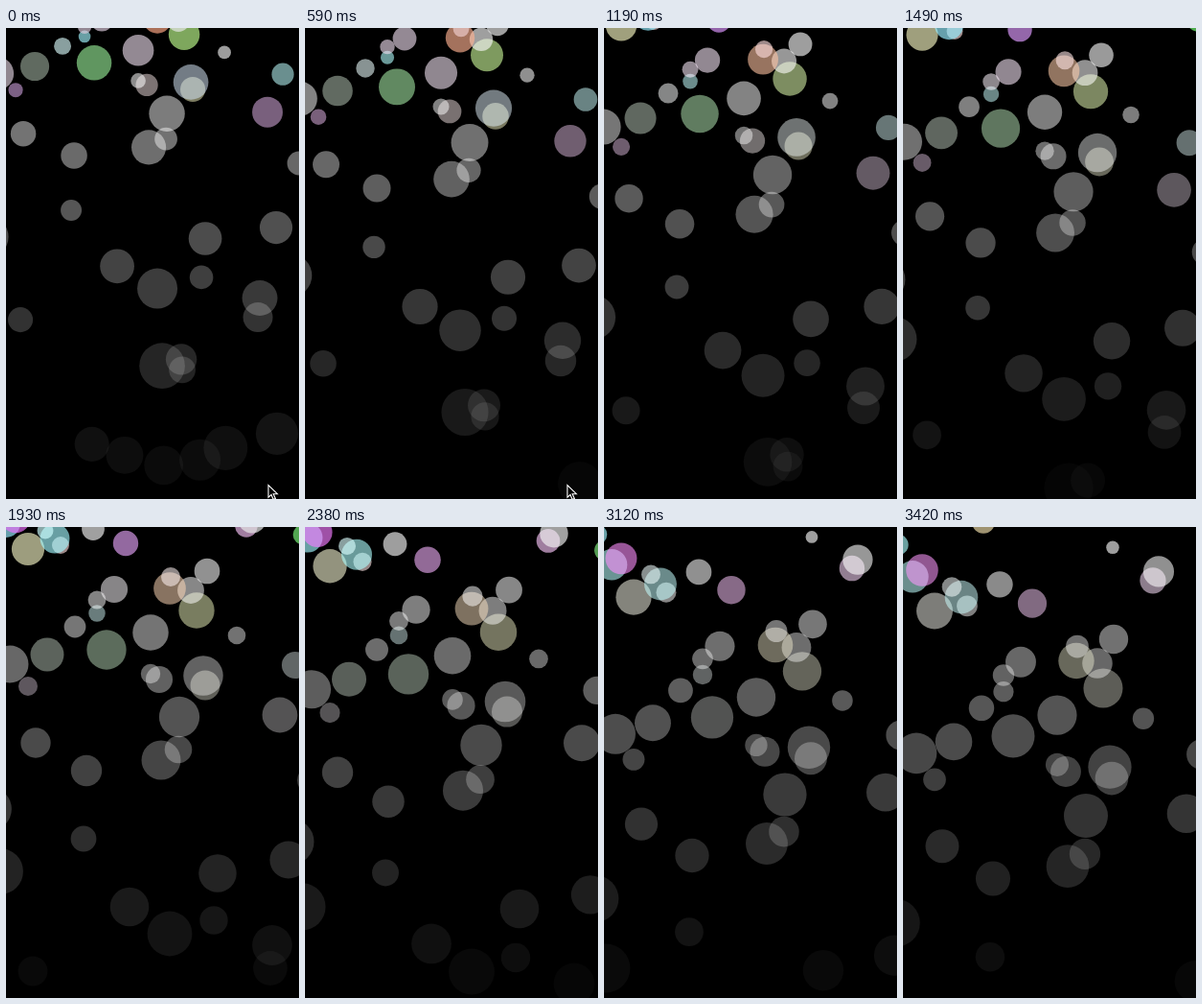
These frames come from a looping animation (306x491 px, 3.54 s). An HTML page:

```html
<!DOCTYPE html>
<html lang="en">
<head>
<meta charset="utf-8">
<title>Falling bubbles</title>
<style>
  html, body { margin: 0; width: 100%; height: 100%; overflow: hidden; background: #000; }
  svg { display: block; width: 306px; height: 491px; }
</style>
</head>
<body>
<svg viewBox="0 0 306 491">
  <g id="bubbles"></g>
  <path id="cursor" d="M274 476.5v12.8l3-2.8 2.2 5 2.2-1-2.2-4.8h4.2z" fill="#000" stroke="#fff" stroke-width="1.1"/>
</svg>
<script>
const LOOP = 3540, STEP = 14.86, LAST = 23, MIDDLE = 1.93;

// Every bubble follows one rule: it falls faster, drifts right, grows, turns white and fades.
const SPEED = 32.8, GRAVITY = 7.5, DRIFT = 6.7, GROWTH = 1.25, BLEACH = 0.11;
const ALPHA = 0.67, FADE = 8, LIFE = 7.8;

const fallen = age => SPEED * age + GRAVITY * age * age / 2;
const ageAt = y => (Math.sqrt(SPEED * SPEED + 2 * GRAVITY * y) - SPEED) / GRAVITY;

const layer = document.getElementById('bubbles');
const cursor = document.getElementById('cursor');
const bubbles = [];

// Adds bubbles of one birth radius and tint at their mid-loop places
function add(tint, r, ...places) {
  const rgb = [...tint].map(d => parseInt(d, 16) / 15);
  for (const [x, y] of places) bubbles.push({ x, r, rgb, age: ageAt(y) });
}

const pale = 'eee', dusk = 'dcd', teal = '9ef', mist = 'cff', rose = 'ecc';

add(pale, 6, [81, 325], [217, 410], [28, 463], [197, 525], [151, 153], [241, 113], [209, -26]);
add(pale, 8.5, [276, 460], [196, 512], [319, 264], [180, 232]);
add(pale, 10, [84, 254], [31, 225]);
add(pale, 11.8, [295, 347], [221, 361], [278, 436], [129, 396], [210, 46], [193, 66], [91, 2]);
add(pale, 14.5, [171, 424], [162, 243], [257, -8]);
add(pale, 16, [-6, 359], [-17, 294], [181, 198], [176, 520]);

add(dusk, 7, [95, 76]);
add(dusk, 12, [113, 65]);
add(dusk, 15.5, [151, 110], [4, 143]);
add(teal, 6, [95, 90]);
add(teal, 10, [302, 144], [-15, -28]);
add(teal, 15, [51, 12], [0, -4]);
add(mist, 8.3, [72, 104], [41, 4]);
add('abc', 16.5, [206, 155]);
add(rose, 8.3, [57, 19], [172, 52]);
add('baa', 9.7, [160, 159]);
add('b8c', 5.5, [23, 166]);
add('b8c', 13.3, [286, 196]);
add('d9f', 12.6, [125, 17]);
add('ebe', 11.8, [251, -1]);
add('e7f', 15.3, [10, -9]);
add('8e8', 17, [105, 128]);
add('7f7', 10, [310, 8]);
add('bf8', 16, [199, 87]);
add('898', 13.7, [43, 133]);
add('bb8', 11, [208, 165]);
add('eeb', 16.3, [23, 23]);
add('eda', 12, [74, -44]);
add('fa8', 14.8, [171, 64]);

// The dying ones near the floor are scattered by chance
let seed = 7;
const random = () => (seed = seed * 16807 % 2147483647) / 2147483647;
for (let i = 0; i < 6; i++) {
  add(pale, 9 + 6 * random(), [40 * i + 75 + 30 * random(), 600 + 55 * random()]);
}

// Younger bubbles lie on top
bubbles.sort((a, b) => b.age - a.age);
for (const b of bubbles) {
  b.el = document.createElementNS('http://www.w3.org/2000/svg', 'circle');
  layer.append(b.el);
}

function moveBubble(b, sec) {
  const age = b.age + sec;
  const set = (name, value) => b.el.setAttribute(name, value);
  const rgb = b.rgb.map(c => Math.round(255 * Math.min(1, c + BLEACH * age)));
  set('cx', b.x + DRIFT * sec);
  set('cy', fallen(age));
  set('r', b.r + GROWTH * Math.max(0, age));
  set('fill', `rgb(${rgb})`);
  set('fill-opacity', age < LIFE ? ALPHA * (1 - age / FADE) : 0);
}

// The picture advances in steps of about 149 ms
const stepStart = i => 10 * Math.round(STEP * i);

function draw(ms) {
  let i = LAST;
  while (i > 0 && stepStart(i) > ms) i--;
  const now = stepStart(i);
  for (const b of bubbles) moveBubble(b, now / 1000 - MIDDLE);
  cursor.style.display = now < 1040 ? '' : 'none';
}

const start = performance.now();
function tick() {
  draw((performance.now() - start) % LOOP);
  requestAnimationFrame(tick);
}
tick();
</script>
</body>
</html>
```
